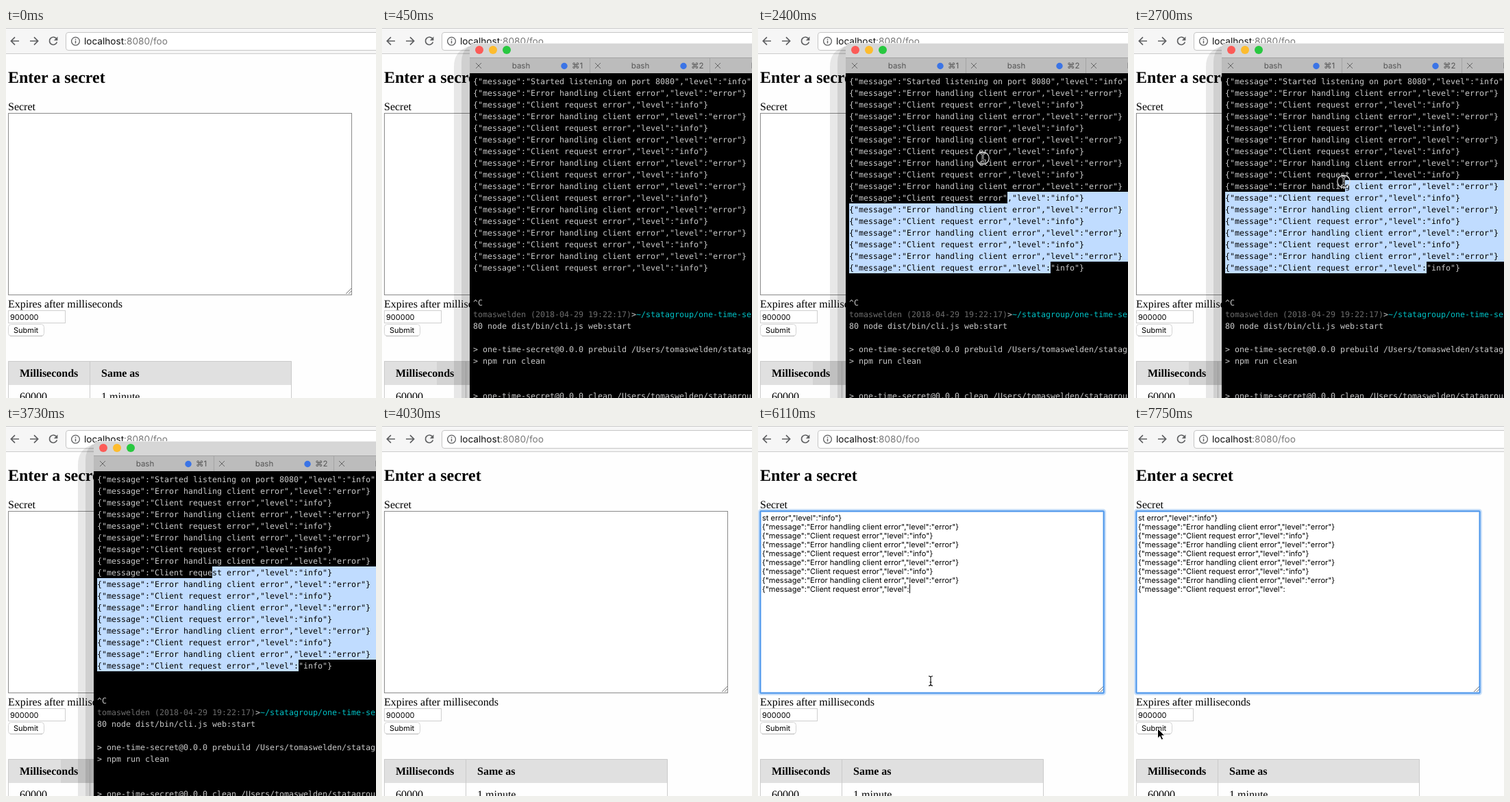
These frames come from a looping animation (540x540 px, 8 s). An HTML page:

```html
<!DOCTYPE html>
<html lang="en">
<head>
<meta charset="utf-8">
<title>One time secret</title>
<style>
  html, body { margin: 0; width: 100%; height: 100%; overflow: hidden; background: #fefefe; }
  svg { display: block; width: 540px; height: 540px; text-rendering: geometricPrecision; }
  .page { font: 16px "Liberation Serif", serif; }
  .ui { font: 11px Inter, sans-serif; }
  .url { font: 13.6px Inter, sans-serif; }
  .mono { font: 11.63px "DejaVu Sans Mono", monospace; }
  .tab { font: 11.5px Inter, "DejaVu Sans", sans-serif; fill: #555; }
  .bold { font-weight: bold; }
  .icon { fill: none; stroke: #5f6062; stroke-width: 1.7; }
  .line { fill: none; stroke: #cbcbcb; }
</style>
</head>
<body>
<svg viewBox="0 0 540 540">
  <defs>
    <clipPath id="picked"><path id="pickedArea"/></clipPath>
    <path id="beam" d="M-3-7Q0-7 0-5Q0-7 3-7M0-5V5M-3 7Q0 7 0 5Q0 7 3 7M-1.5 2H1.5" fill="none"/>
    <g id="tab">
      <path d="M9 51l8 8m0-8l-8 8" stroke="#666" fill="none"/>
      <text class="tab" x="75" y="59" text-anchor="middle">bash</text>
      <circle cx="138" cy="55.5" r="4.7" fill="#3b74e6"/>
    </g>
  </defs>

  <rect width="540" height="540" fill="#fefefe"/>
  <rect width="540" height="37" fill="#f6f6f6"/>
  <path class="line" d="M0 .5H540M0 37.5H540" stroke="#bdbdbd"/>
  <rect x="87.5" y="6.5" width="470" height="26" rx="3.5" fill="#fff" stroke="#c6c6c6"/>
  <path class="icon" d="M19 19H8M13 13.4L7.4 19L13 24.6M35 19H46M41 13.4L46.6 19L41 24.6"/>
  <path class="icon" d="M73.3 15.2A5.6 5.6 0 1 0 74.4 20.6"/>
  <path d="M75.4 12.6V18.2H69.8Z" fill="#5f6062"/>
  <circle class="icon" cx="101.5" cy="19.3" r="5.9" style="stroke-width:1.3"/>
  <path class="icon" d="M101.5 18.4V22.6M101.5 15.8V17.2" style="stroke-width:1.5"/>
  <text class="url" x="114" y="24.3" fill="#111">localhost<tspan fill="#777">:8080/foo</tspan></text>

  <g class="page">
    <text class="bold" x="3" y="80" font-size="24" style="font-size:24px">Enter a secret</text>
    <text x="3" y="120">Secret</text>
    <text x="3" y="408">Expires after milliseconds</text>
  </g>
  <rect x="3.5" y="124.5" width="501" height="265" fill="#fff" stroke="#8a8a8a"/>
  <path d="M496 388l8-8M500 388l4-4" stroke="#777" fill="none"/>
  <g id="ring" fill="none" stroke="#4f98ec">
    <rect x="2.5" y="123.5" width="503" height="267" rx="2" stroke-width="5" opacity=".3"/>
    <rect x="3.3" y="124.3" width="501.4" height="265.4" rx="1" stroke-width="2"/>
  </g>
  <g id="pasted" class="ui"></g>
  <path id="caret" stroke="#000"/>

  <rect x="3.5" y="412.5" width="83" height="18" fill="#fff" stroke="#cfcfcf"/>
  <text class="ui" x="6" y="426">900000</text>
  <rect x="3.5" y="432.5" width="52" height="17" rx="4" fill="#fff" stroke="#d4d4d4"/>
  <path d="M6 449.5H53" stroke="#b5b5b5"/>
  <text class="ui" x="11" y="445">Submit</text>

  <rect x="3" y="486" width="414" height="35" fill="#e0e0e0"/>
  <path class="line" d="M3.5 540V486.5H416.5V540M122.5 487V540"/>
  <g class="page">
    <text class="bold" x="20" y="509">Milliseconds</text>
    <text class="bold" x="139" y="509">Same as</text>
    <text x="20" y="543">60000</text>
    <text x="139" y="543">1 minute</text>
  </g>

  <g id="terminal">
    <rect x="80" y="487" width="48" height="34" opacity=".06"/>
    <path d="M105 540V56Q105 34 126 27H540V540Z" opacity=".09"/>
    <path d="M116 540V50Q116 34 126 27H540V540Z" opacity=".1"/>
    <path d="M128 540V28Q128 22 134 22H540V540Z" fill="#d6d6d6"/>
    <path d="M133 22.5H540" stroke="#ececec"/>
    <circle cx="142" cy="32" r="6" fill="#fc5b57"/>
    <circle cx="162" cy="32" r="6" fill="#fdbc2e"/>
    <circle cx="182" cy="32" r="6" fill="#28c840"/>
    <rect x="128" y="43" width="412" height="23" fill="#bcbcbc"/>
    <path d="M128 43.5H540M303.5 43V66M478.5 43V66" stroke="#a3a3a3"/>
    <use href="#tab" x="128"/><text class="tab" x="277" y="59">⌘1</text>
    <use href="#tab" x="302"/><text class="tab" x="451" y="59">⌘2</text>
    <use href="#tab" x="477"/>
    <rect x="128" y="66" width="412" height="474"/>
    <g id="rows" class="mono" fill="#c9c9c9"></g>
    <path id="highlight" fill="#c0dcff"/>
    <g id="darkRows" class="mono" fill="#000" clip-path="url(#picked)"></g>
  </g>

  <g id="pointer">
    <g id="ibeam">
      <circle id="halo" r="9.2" fill="none" stroke="#ddd" stroke-width="1.2"/>
      <use href="#beam" stroke="#fff" stroke-width="2.6"/>
      <use href="#beam" stroke="#000" stroke-width="1.1"/>
    </g>
    <path id="arrow" d="M0 0V14.4L3.3 11.3L5.6 16.6L8.2 15.5L5.9 10.4H10.4Z" stroke="#fff"/>
  </g>
</svg>
<script>
const LOOP = 8000, LEFT = 133, TOP = 69, CELL = 7, ROW = 17;
const $ = id => document.getElementById(id);
const show = (id, on) => $(id).setAttribute('display', on ? 'inline' : 'none');

const log = (message, level) => `{"message":"${message}","level":"${level}"}`;
const lines = [log('Started listening on port 8080', 'info')];
for (let i = 1; i <= 16; i++)
  lines.push(i % 2 ? log('Error handling client error', 'error') : log('Client request error', 'info'));
lines[19] = '^C';
lines[21] = '80 node dist/bin/cli.js web:start';
lines[23] = '> one-time-secret@0.0.0 prebuild /Users/tomaswelden/statagroup';
lines[24] = '> npm run clean';
lines[27] = '> one-time-secret@0.0.0 clean /Users/tomaswelden/statagroup';

const END = { row: 16, col: 42 };
const pasted = lines.slice(8, 17);
pasted[0] = pasted[0].slice(24);
pasted[8] = pasted[8].slice(0, END.col);

function addText(parent, x, y, text, fill) {
  const el = document.createElementNS('http://www.w3.org/2000/svg', 'text');
  el.setAttribute('x', x);
  el.setAttribute('y', y);
  if (fill) el.setAttribute('fill', fill);
  el.textContent = text;
  $(parent).append(el);
}
const baseline = row => TOP + 13 + row * ROW;
lines.forEach((text, row) => {
  addText('rows', LEFT, baseline(row), text);
  if (row <= END.row) addText('darkRows', LEFT, baseline(row), text);
});
addText('rows', LEFT, baseline(20), 'tomaswelden (2018-04-29 19:22:17)', '#6c6c6c');
addText('rows', LEFT + 33 * CELL, baseline(20), '>');
addText('rows', LEFT + 34 * CELL, baseline(20), '~/statagroup/one-time-secret', '#00c2c6');
pasted.forEach((text, i) => addText('pasted', 6, 138 + i * 13, text));

// [start, shape, x, y]
const pointer = [
  [0, ''],
  [1350, 'beam', 513.5, 350],
  [1800, 'halo', 450, 356],
  [1950, 'halo', 424, 351],
  [2100, 'halo', 421, 348],
  [2250, 'halo', 362, 246],
  [2400, 'halo', 328, 190],
  [2550, 'halo', 300, 147],
  [2700, 'halo', 306, 224],
  [2850, 'halo', 303, 213],
  [2990, 'halo', 302, 212],
  [3440, 'halo', 214, 298],
  [3580, 'arrow', 74, 415],
  [3730, ''],
  [4180, 'beam', 124.5, 323],
  [5370, 'beam', 196, 350],
  [5520, 'beam', 252, 372],
  [6560, 'arrow', 451, 507],
  [6710, 'arrow', 292, 476],
  [7010, 'arrow', 180, 466],
  [7160, 'arrow', 92, 452],
  [7310, 'arrow', 46, 444],
  [7460, 'arrow', 27, 441],
  [7600, 'arrow', 30, 441],
  [7750, 'arrow', 34.5, 441.5]
];
// [start, row, column] of the moving end of the selection
const selection = [
  [0, 16, 42], [2100, 16, 41], [2400, 10, 33], [2550, 4, 24], [2700, 9, 25], [2850, 8, 24]
];
const at = (track, t) => track.findLast(step => step[0] <= t);
const within = (t, from, to) => t >= from && t < to;

function selectionPath(row, col) {
  const x = LEFT + col * CELL, endX = LEFT + END.col * CELL;
  const y = TOP + row * ROW, endY = TOP + END.row * ROW;
  if (row === END.row) return `M${x} ${y}H${endX}V${y + ROW}H${x}Z`;
  return `M${x} ${y}H540V${endY}H${endX}V${endY + ROW}H${LEFT}V${y + ROW}H${x}Z`;
}

function draw(t) {
  show('terminal', within(t, 450, 4030));
  const [, row, col] = at(selection, t);
  const area = selectionPath(row, col);
  $('highlight').setAttribute('d', area);
  $('pickedArea').setAttribute('d', area);

  show('ring', t >= 4480);
  show('pasted', t >= 5080);
  show('caret', within(t, 4480, 5520) || within(t, 5960, 6560) || within(t, 7010, 7600));
  $('caret').setAttribute('d', t < 5080 ? 'M6.5 127V140' : 'M221.5 231V244');

  const [, shape, x = 0, y = 0] = at(pointer, t);
  $('pointer').setAttribute('transform', `translate(${x} ${y})`);
  show('ibeam', shape === 'beam' || shape === 'halo');
  show('halo', shape === 'halo');
  show('arrow', shape === 'arrow');
}

function tick() {
  draw(performance.now() % LOOP);
  requestAnimationFrame(tick);
}
tick();
</script>
</body>
</html>
```
